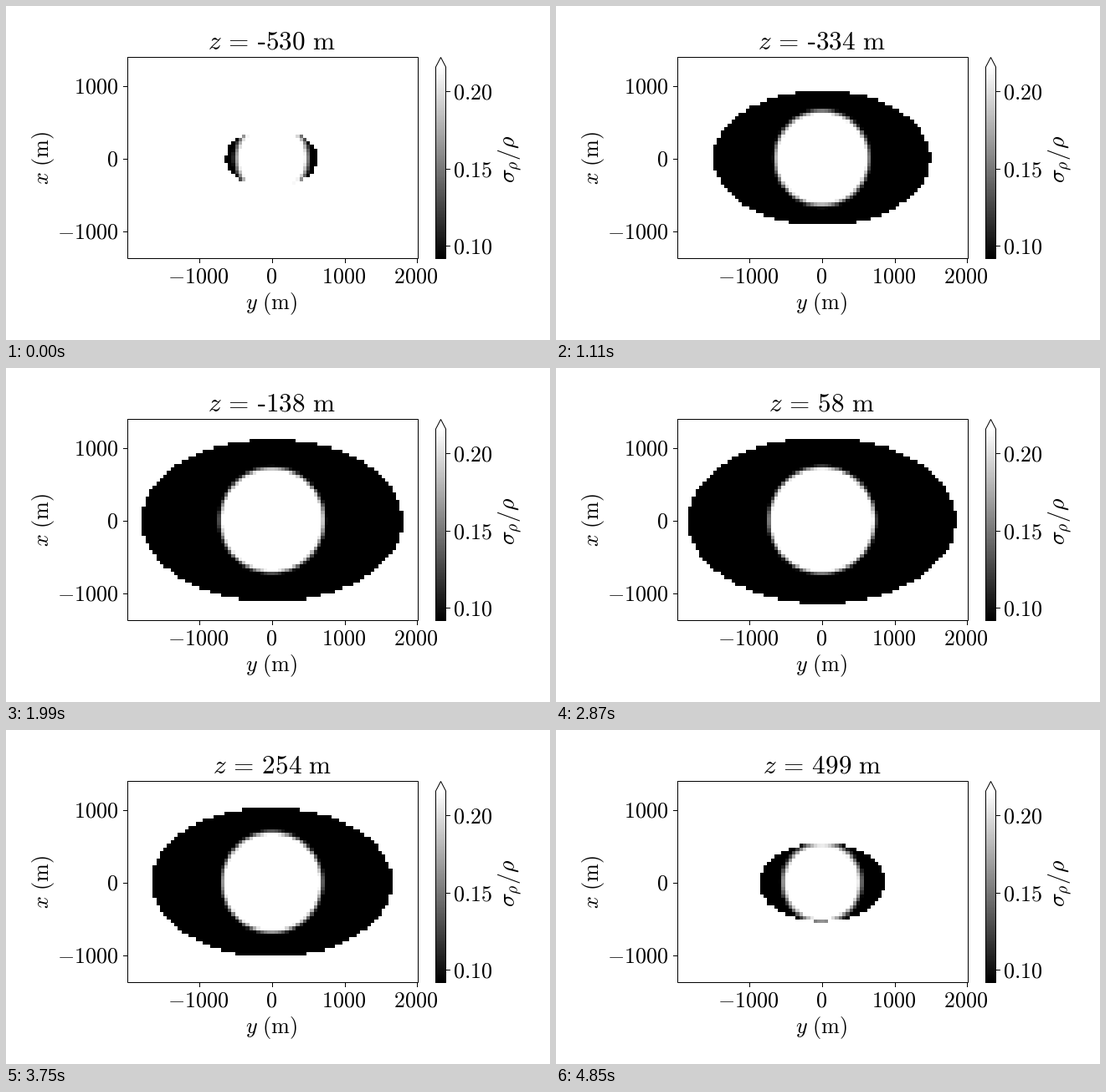
Recreate the animation shown at these times as a matplotlib script. Size 650x400 px, loop 5.07 s.

```python
import matplotlib.pyplot as plt
import numpy as np
from matplotlib.animation import FuncAnimation

plt.rcParams["mathtext.fontset"] = "cm"
plt.rcParams["font.family"] = "Liberation Serif"

WIDTH, HEIGHT, DPI = 650, 400, 100
LOOP_MS, STEP_MS = 5070, 10
FIRST_MS, SLICE_MS = 450, 220

# Plot area in whole pixels, and the cell grid laid over it
LEFT, RIGHT, TOP, BOTTOM = 146, 492, 62, 302
CELL_W, CELL_H = 4.275, 4.31
GRID_X, GRID_Y = 145.38, 58.73
CELL_M = 49.4

# Ellipsoid: centre and half axes in cells, depth in metres
MID_COL, MID_ROW = 40.33, 28.68
HALF_COLS, HALF_ROWS, HALF_DEPTH = 37.6, 23.273, 564.5

# Spherical core: radius where it turns black, width of the fade to white
CORE_RADIUS, CORE_FADE, CORE_Z = 766, 66, 5

TICK_SIZE, TITLE_SIZE, BAR_SIZE = 18.8, 22.5, 20


def cell_offsets(start, stop, origin, size, middle):
    """Distance in cells from the middle, for each pixel in a range."""
    pixels = np.arange(start, stop) + 0.5
    return np.floor((pixels - origin) / size) + 0.5 - middle


cols = cell_offsets(LEFT, RIGHT, GRID_X, CELL_W, MID_COL)[None, :]
rows = cell_offsets(TOP, BOTTOM, GRID_Y, CELL_H, MID_ROW)[:, None]


def slice_image(z):
    inside = ((cols / HALF_COLS) ** 2 + (rows / HALF_ROWS) ** 2
              + (z / HALF_DEPTH) ** 2) <= 1
    radius = np.sqrt((cols**2 + rows**2) * CELL_M**2 + (z - CORE_Z) ** 2)
    shade = np.clip((CORE_RADIUS - radius) / CORE_FADE, 0, 1)
    return np.where(inside, shade, 1.0)


def title_text(z):
    sign = "-" if z < 0 else ""
    return rf"$z\,=\,${sign}$\mathrm{{{abs(z)}\ m}}$"


fig = plt.figure(figsize=(WIDTH / DPI, HEIGHT / DPI), dpi=DPI, facecolor="white")
ax = fig.add_axes([0, 0, 1, 1])
ax.axis("off")


def show(data, left, right, top, bottom):
    return ax.imshow(data, cmap="gray", vmin=0, vmax=1, aspect="auto",
                     interpolation="nearest", extent=(left, right, bottom, top))


def line(xs, ys, snap=False):
    """Black stroke one pixel wide; coordinates are pixel centres."""
    ax.plot(xs, ys, color="black", lw=0.72, snap=snap,
            solid_joinstyle="miter", solid_capstyle="butt")


def label(x, y, text, size=TICK_SIZE, ha="center", rotation=0):
    return ax.text(x, y, text, size=size, ha=ha, va="baseline",
                   rotation=rotation, rotation_mode="anchor")


field = show(slice_image(-530), LEFT, RIGHT, TOP, BOTTOM)
show(np.linspace(1, 0, 229)[:, None], 514, 525, 73, 302)

# Frame and its ticks
line([145.5, 492.5, 492.5, 145.5, 145.5], [61.5, 61.5, 302.5, 302.5, 61.5])
for value, x in zip((-1000, 0, 1000, 2000), (231.5, 318.5, 405.5, 491.5)):
    line([x, x], [303, 308])
    label(x - 1.7, 331.5, f"${value}$")
for value, y in zip((1000, 0, -1000), (96.5, 183.5, 270.5)):
    line([140, 145], [y, y])
    label(134.5, y + 7.7, f"${value}$", ha="right")

# Colour bar with an open upper end
line([513.5, 513.5, 519.5, 525.5, 525.5, 513.5],
     [302.5, 73, 61.5, 73, 302.5, 302.5])
for value, y in zip(("0.20", "0.15", "0.10"), (102.5, 195.5, 287.5)):
    line([526, 531], [y, y])
    label(533.7, y + 9, f"${value}$", ha="left")

label(317.3, 363.5, r"$y\ \mathrm{(m)}$")
label(50.5, 182, r"$x\ \mathrm{(m)}$", rotation=90)
label(609, 183, r"$\sigma_\rho/\rho$", BAR_SIZE, rotation=90)
title = label(317.7, 51.7, title_text(-530), TITLE_SIZE)

ax.set_xlim(0, WIDTH)
ax.set_ylim(HEIGHT, 0)


def update(frame):
    t = frame * STEP_MS
    index = 0 if t < FIRST_MS else 1 + (t - FIRST_MS) // SLICE_MS
    z = -530 + 49 * index
    field.set_data(slice_image(z))
    title.set_text(title_text(z))
    return field, title


anim = FuncAnimation(fig, update, frames=LOOP_MS // STEP_MS, interval=STEP_MS,
                     repeat=True, repeat_delay=0)
plt.show()
```
